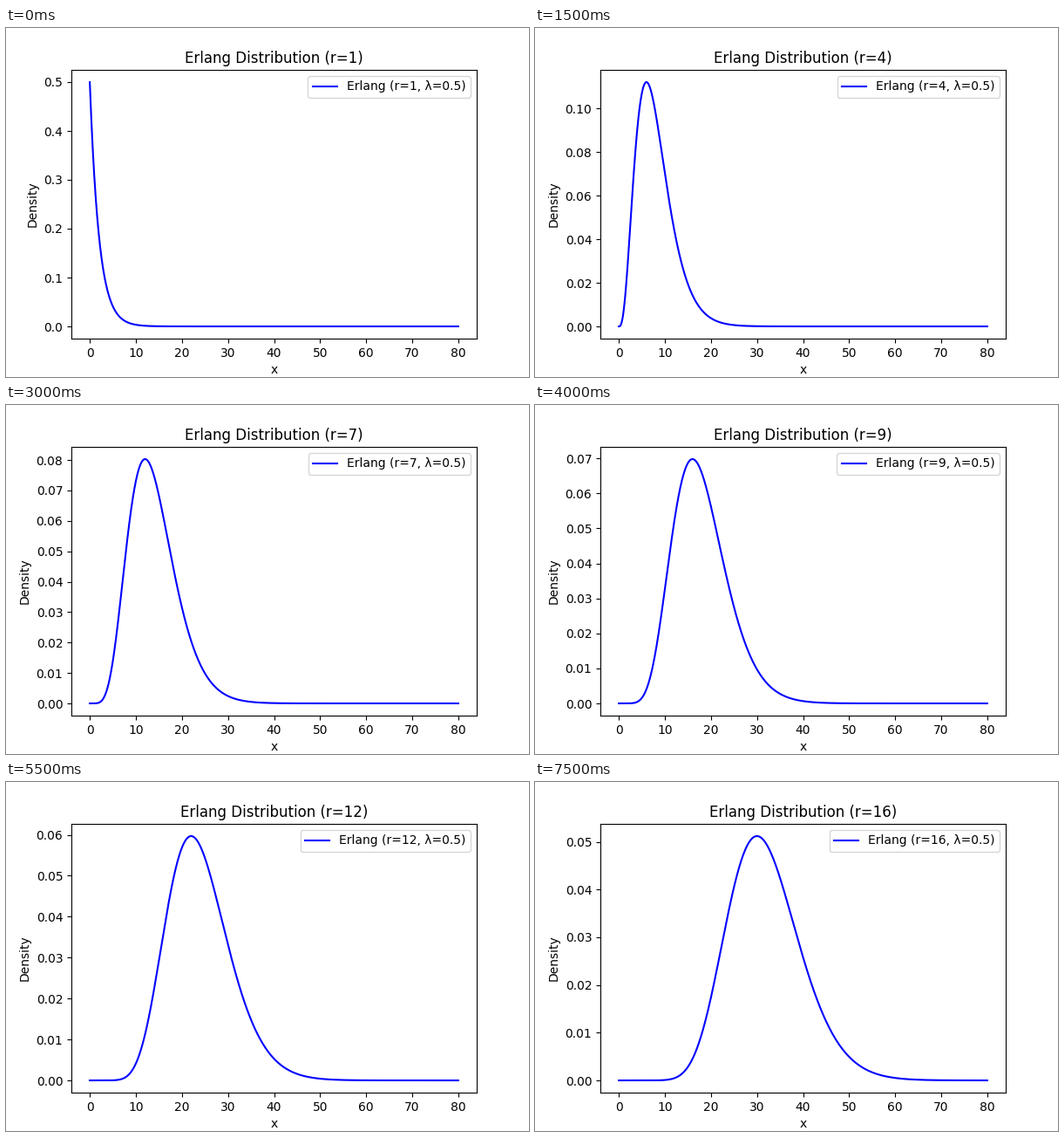
A matplotlib script that plays this animation: 600 by 400 pixels, repeating every 8 s.

```python
import math

import matplotlib.pyplot as plt
import numpy as np
from matplotlib.animation import FuncAnimation

RATE = 0.5
SHAPES = range(1, 17)

x = np.linspace(0, 80, 1000)
fig, ax = plt.subplots(figsize=(6, 4), dpi=100)


def erlang_pdf(x, r, rate):
    return rate**r * x**(r - 1) * np.exp(-rate * x) / math.factorial(r - 1)


def draw(r):
    ax.clear()
    ax.plot(x, erlang_pdf(x, r, RATE), color="blue",
            label=f"Erlang (r={r}, λ={RATE})")
    ax.set_title(f"Erlang Distribution (r={r})")
    ax.set_xlabel("x")
    ax.set_ylabel("Density")
    ax.legend(loc="upper right")


anim = FuncAnimation(fig, draw, frames=SHAPES, init_func=lambda: draw(SHAPES[0]),
                     interval=500, repeat=True, repeat_delay=0)
plt.show()
```
